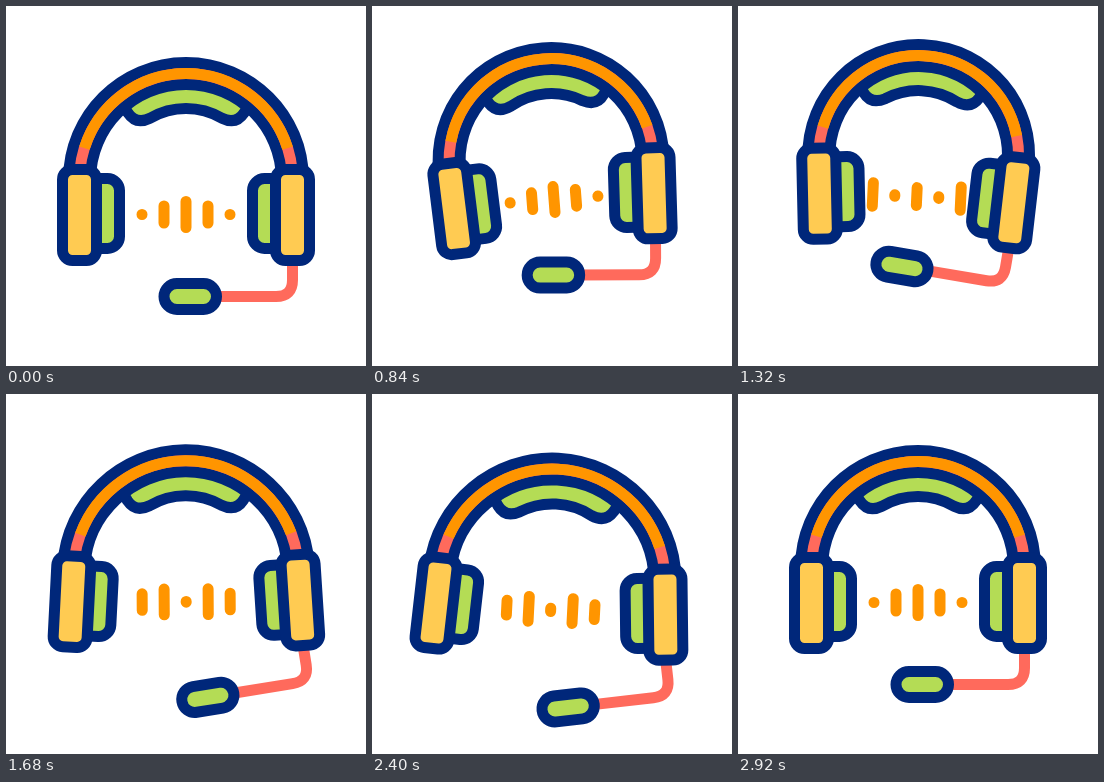
Write an HTML page that moves like this. It is 360 px wide and 360 px high and loops after 3.2 s.

```html
<!DOCTYPE html>
<html lang="en">
<head>
<meta charset="utf-8">
<title>Headset</title>
<style>
  html, body { margin: 0; height: 100%; overflow: hidden; background: #fff; }
  svg { display: block; width: 100%; height: 100%; }
  .line { fill: none; }
  .navy { stroke: #00277a; stroke-width: 11; }
  .green { fill: #b4dc55; }
  .yellow { fill: #ffcb52; }
  .coral { stroke: #ff6a5c; stroke-width: 11; }
  .orange { stroke: #ff9500; stroke-width: 11; }
</style>
</head>
<body>
<svg viewBox="0 0 360 360">
  <defs>
    <g id="cup" class="navy">
      <rect class="green" x="75" y="172.5" width="38.5" height="70" rx="12"/>
      <rect class="yellow" x="56.5" y="163.5" width="34" height="91" rx="10"/>
    </g>
  </defs>
  <g id="body">
    <path class="green navy" d="M116 97L122 107Q130 119 144 112.2A71.5 71.5 0 0 1 216 112.2Q230 119 238 107L244 97A99.5 99.5 0 0 0 116 97Z"/>
    <path class="band line navy" style="stroke-width:33"/>
    <path class="band line coral"/>
    <path class="band line orange" pathLength="1" stroke-dasharray="0 .097 .806 1"/>
    <g id="left"><use href="#cup"/></g>
    <g id="right">
      <g id="mic">
        <path class="line coral" d="M286.5 250V274Q286.5 290.5 270 290.5H205"/>
        <rect class="green navy" x="158" y="277.5" width="52.5" height="26" rx="13"/>
      </g>
      <use href="#cup" transform="translate(360) scale(-1 1)"/>
    </g>
    <path id="bars" class="line orange" stroke-linecap="round"/>
  </g>
</svg>
<script>
const LOOP = 3200, START = 200, END = 2920;
const HOP = 660, FIRST = 400, LAST = FIRST + 3 * HOP, SWAY = 1060;
const { PI, sin, cos, abs, min, max, asin } = Math;
const $ = id => document.getElementById(id);
const bands = document.querySelectorAll('.band');

// bar lengths from the outside to the middle
const calm = [0, 17, 26], wide = [26, 0, 17], split = [17, 26, 0];

const progress = (t, from, to) => min(1, max(0, (t - from) / (to - from)));
const ramp = (t, from, to) => (1 - cos(PI * progress(t, from, to))) / 2;

function bandPath(angle) {
  const r = -angle * PI / 180;
  const turn = (x, y) => [
    95 + (x - 95) * cos(r) - (y - 75) * sin(r),
    75 + (x - 95) * sin(r) + (y - 75) * cos(r)
  ];
  const [x, y] = turn(73.5, 174), [cx, cy] = turn(73.5, 115.2);
  return `M${x} ${y}C${cx} ${cy} 121.2 67.5 180 67.5S${360 - cx} ${cy} ${360 - x} ${y}`;
}

function barsPath(phase) {
  const s = asin(sin(phase * 2 * PI)) * 2 / PI;
  const goal = s > 0 ? split : wide;
  return [0, 1, 2, 1, 0].map((n, i) => {
    const len = max(.01, calm[n] + (goal[n] - calm[n]) * abs(s));
    return `M${136 + 22 * i} ${208.5 - len / 2}v${len}`;
  }).join('');
}

function draw(now) {
  const t = now % LOOP;
  const hop = sin(PI * (progress(t, FIRST, LAST) * 3)) ** 2;
  const settle = ramp(t, LAST, END);
  const live = ramp(t, FIRST, FIRST + HOP / 2) - settle;
  // crouch before the first hop and after the last
  const dip = ramp(t, START, FIRST) + ramp(t, LAST - 430, LAST) - live - 2 * settle;

  const squeeze = 8.4 * hop - 3.6 * live;
  const swing = 9.8 * hop - 5.8 * live;
  const tilt = (4 * sin(2 * PI * (t - 1160) / SWAY) - .6) * live;
  const k = progress(t, START, END);
  const cycles = 4 * (k + .02 * sin(PI * k));

  const set = (id, value) => $(id).setAttribute('transform', value);
  set('body', `translate(0 ${7.5 * dip - 20 * hop}) rotate(${tilt} 180 182)`);
  set('left', `rotate(${-squeeze} 95 75)`);
  set('right', `rotate(${squeeze} 265 75)`);
  set('mic', `rotate(${swing} 286.5 257)`);
  const d = bandPath(squeeze);
  bands.forEach(band => band.setAttribute('d', d));
  $('bars').setAttribute('d', barsPath(cycles));
}

const start = performance.now();
function frame() {
  draw(performance.now() - start);
  requestAnimationFrame(frame);
}
frame();
</script>
</body>
</html>
```
